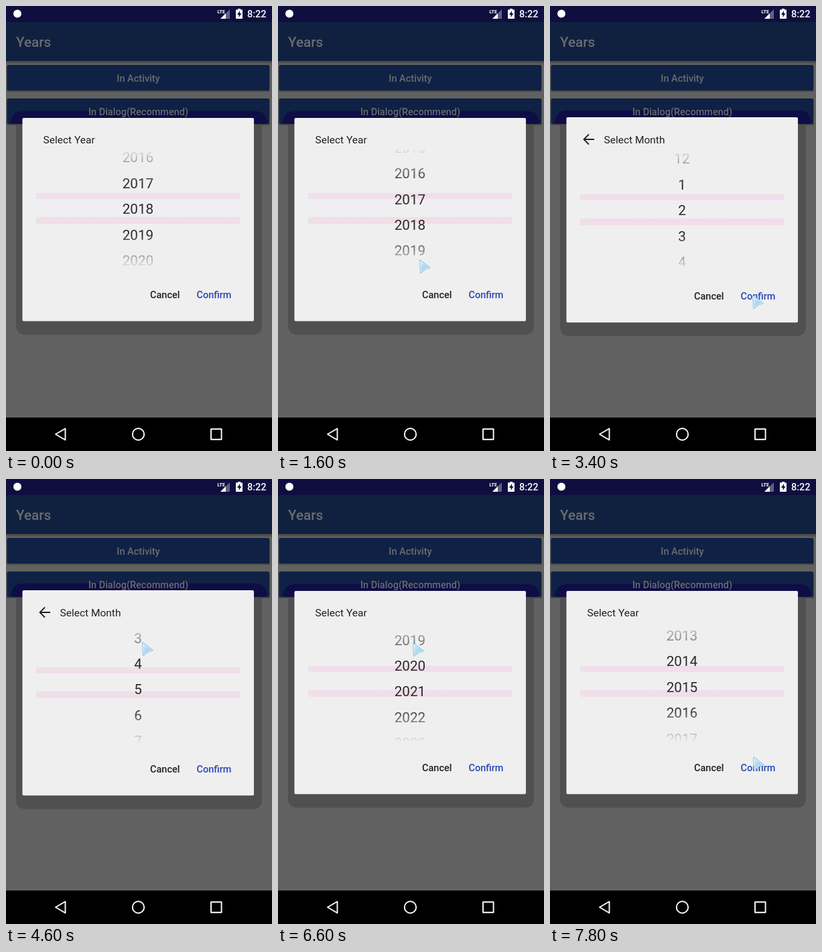
Write an HTML page that moves like this. It is 397 px wide and 664 px high and loops after 8000 ms.

```html
<!DOCTYPE html>
<html lang="en">
<head>
<meta charset="utf-8">
<title>Year picker</title>
<style>
html, body { margin: 0; width: 100%; height: 100%; overflow: hidden; background: #616161; }
svg { display: block; width: 100%; height: 100%; font-family: Roboto, "Noto Sans", sans-serif; }
.label { font-size: 14.5px; font-weight: 500; }
.head { font-size: 15.5px; fill: #212121; }
.wheel { font-size: 20.7px; fill: #2a2a2a; }
.mid { text-anchor: middle; }
.dim { fill: #6c6c6e; }
.nav { fill: none; stroke: #fff; stroke-width: 1.9; stroke-linejoin: round; }
</style>
</head>
<body>
<svg viewBox="0 0 397 664">
  <defs>
    <linearGradient id="fade" gradientUnits="userSpaceOnUse" x1="0" y1="212" x2="0" y2="393">
      <stop offset="0" stop-color="#000"/>
      <stop offset=".29" stop-color="#fff"/>
      <stop offset=".71" stop-color="#fff"/>
      <stop offset="1" stop-color="#000"/>
    </linearGradient>
    <linearGradient id="bar" x1="0" y1="0" x2="0" y2="1">
      <stop offset="0" stop-color="#f1dfe5"/>
      <stop offset="1" stop-color="#efdef0"/>
    </linearGradient>
    <linearGradient id="bar2" x1="0" y1="0" x2="0" y2="1">
      <stop offset="0" stop-color="#efdef0"/>
      <stop offset="1" stop-color="#f1dfe2"/>
    </linearGradient>
    <linearGradient id="under" x1="0" y1="0" x2="0" y2="1">
      <stop offset="0" stop-color="#444"/>
      <stop offset="1" stop-color="#616161"/>
    </linearGradient>
    <linearGradient id="ice" x1="0" y1="0" x2="1" y2="1">
      <stop offset="0" stop-color="#d5eefb"/>
      <stop offset="1" stop-color="#7dc0ec"/>
    </linearGradient>
    <mask id="soft" maskUnits="userSpaceOnUse" x="45" y="213" width="304" height="180">
      <rect x="45" y="213" width="304" height="180" fill="url(#fade)"/>
    </mask>
  </defs>

  <!-- Page -->
  <rect width="397" height="664" fill="#616161"/>
  <rect y="82" width="397" height="5" fill="url(#under)"/>
  <rect width="397" height="24" fill="#0f0e3f"/>
  <rect y="24" width="397" height="58" fill="#10213f"/>
  <text class="dim" x="15" y="61" font-size="20.7" font-weight="500">Years</text>
  <g fill="#484848">
    <rect x="1" y="89" width="393" height="39" rx="2.5"/>
    <rect x="1" y="139" width="393" height="39" rx="2.5"/>
  </g>
  <g fill="#0f2144">
    <rect x="1.5" y="88" width="391.5" height="38" rx="2"/>
    <rect x="1.5" y="138" width="391.5" height="38" rx="2"/>
  </g>

  <!-- Dialog shadow -->
  <path id="crown" fill="#0e0d45"/>
  <path id="skirt" fill="#505050"/>
  <g class="label mid dim">
    <text x="197.5" y="113">In Activity</text>
    <text x="197.5" y="163">In Dialog(Recommend)</text>
  </g>

  <!-- System bars -->
  <circle cx="17" cy="11.5" r="6" fill="#fff"/>
  <path d="M334 5V19H320Z" fill="#62627f"/>
  <path d="M328 11V19H320Z" fill="#fff"/>
  <text x="315.5" y="10.5" font-size="7" font-weight="700" fill="#fff">LTE</text>
  <path d="M346 4h4v1.6h3V19h-10V5.6h3Z" fill="#fff"/>
  <path d="M349 7l-4 6h2.5v4l4-6h-2.5Z" fill="#0f0e3f"/>
  <text class="label" x="360" y="17" fill="#fff">8:22</text>
  <rect y="614" width="397" height="50"/>
  <g class="nav">
    <path d="M74 639L88.5 630.5V647.5Z"/>
    <circle cx="197.5" cy="639" r="8.7"/>
    <rect x="306" y="631.2" width="15.6" height="15.6"/>
  </g>

  <!-- Dialog -->
  <rect id="panel" x="24.5" width="345.5" rx="2" fill="#efefef"/>
  <path id="back" d="M66 199H51M58 191.5L50.5 199L58 206.5" fill="none" stroke="#212121" stroke-width="1.8"/>
  <text id="head" class="head" y="205"></text>
  <g id="body">
    <rect x="45" y="279" width="304.5" height="9" fill="url(#bar)"/>
    <rect x="45" y="315" width="304.5" height="10" fill="url(#bar2)"/>
    <g mask="url(#soft)"><g id="wheel" class="wheel mid"></g></g>
    <text class="label" x="215" y="435.5" fill="#212121">Cancel</text>
    <text class="label" x="284.5" y="435.5" fill="#2b45b4">Confirm</text>
  </g>

  <g id="cursor" stroke-linejoin="round">
    <path d="M2 1.5L16.5 12.5L9.5 14.5L3 20Z" fill="url(#ice)" stroke="#8fc4e8" stroke-width="2"/>
    <path d="M2.5 2.5L15.5 12.5L9 14L3.5 19Z" fill="url(#ice)" stroke="#eaf6fd" stroke-width=".9"/>
  </g>
</svg>
<script>
const LOOP = 8000, STEP = 200, ROW = 38.4, GLIDE = 200;
const $ = id => document.getElementById(id);

// A move takes the cursor to x, y; with a rest value it drags the wheel, which then glides there.
const move = (from, to, x, y, rest) => ({ from, to, x, y, rest });
const scenes = [
  { from: 0, value: 2018, x: 218, y: 356, moves: [
    move(400, 1000, 185, 238, 2021),
    move(1200, 1600, 210, 378, 2018),
    move(2000, 2600, 301, 431)
  ] },
  { from: 3200, month: true, value: 2, x: 301, y: 431, moves: [
    move(3600, 4000, 208, 349),
    move(4000, 4600, 202, 243, 5),
    move(4600, 5000, 51, 198)
  ] },
  { from: 5400, value: 2018, x: 51, y: 198, moves: [
    move(5800, 6200, 205, 345),
    move(6200, 6600, 200, 244, 2025.6),
    move(6800, 7200, 200, 369, 2014.5),
    move(7400, 7800, 302, 414)
  ] }
];

function pose(scene, t) {
  let { x, y, value } = scene, rest = value, release = 0;
  const settle = time => time > release
    ? rest + (value - rest) * Math.exp((release - time) / GLIDE)
    : value;
  for (const m of scene.moves) {
    if (t < m.from) break;
    const u = Math.min(1, (t - m.from) / (m.to - m.from)), p = u * u * (3 - 2 * u);
    const dy = (m.y - y) * p;
    if (m.rest) {
      value = settle(m.from) - dy / ROW;
      rest = m.rest;
      release = m.to;
    }
    x += (m.x - x) * p;
    y += dy;
  }
  return { x, y, value: settle(t) };
}

const rows = Array.from({ length: 7 }, () => {
  const row = document.createElementNS("http://www.w3.org/2000/svg", "text");
  row.setAttribute("x", 197);
  return $("wheel").appendChild(row);
});

function set(id, attrs) {
  for (const key in attrs) $(id).setAttribute(key, attrs[key]);
}

function drawDialog(month) {
  const top = month ? 166 : 167, bottom = month ? 472 : 470, rim = top - 10;
  set("panel", { y: top, height: bottom - top + 0.3 });
  set("crown", { d: `M7 176Q8 ${rim} 24 ${rim}H373Q389 ${rim} 390 176Z` });
  set("skirt", { d: `M15 178H382V${bottom + 6}q0 14.5 -14 14.5H29q-14 0 -14 -14.5Z` });
  set("back", { visibility: month ? "visible" : "hidden" });
  set("head", { x: month ? 80.5 : 55.5 });
  $("head").textContent = month ? "Select Month" : "Select Year";
  set("body", { transform: `translate(0 ${month ? 2 : 0})` });
}

function draw(t) {
  const scene = scenes.filter(s => s.from <= t).pop();
  const { x, y, value } = pose(scene, t), mid = Math.round(value);
  drawDialog(scene.month);
  rows.forEach((row, i) => {
    const n = mid + i - 3;
    row.textContent = scene.month ? (n + 11) % 12 + 1 : n;
    row.setAttribute("y", 310.2 + (n - value) * ROW);
  });
  set("cursor", { transform: `translate(${x} ${y})`, visibility: t < 200 ? "hidden" : "visible" });
}

const start = performance.now();
function tick() {
  const t = (performance.now() - start) % LOOP;
  draw(Math.floor(t / STEP) * STEP);
  requestAnimationFrame(tick);
}
tick();
</script>
</body>
</html>
```
